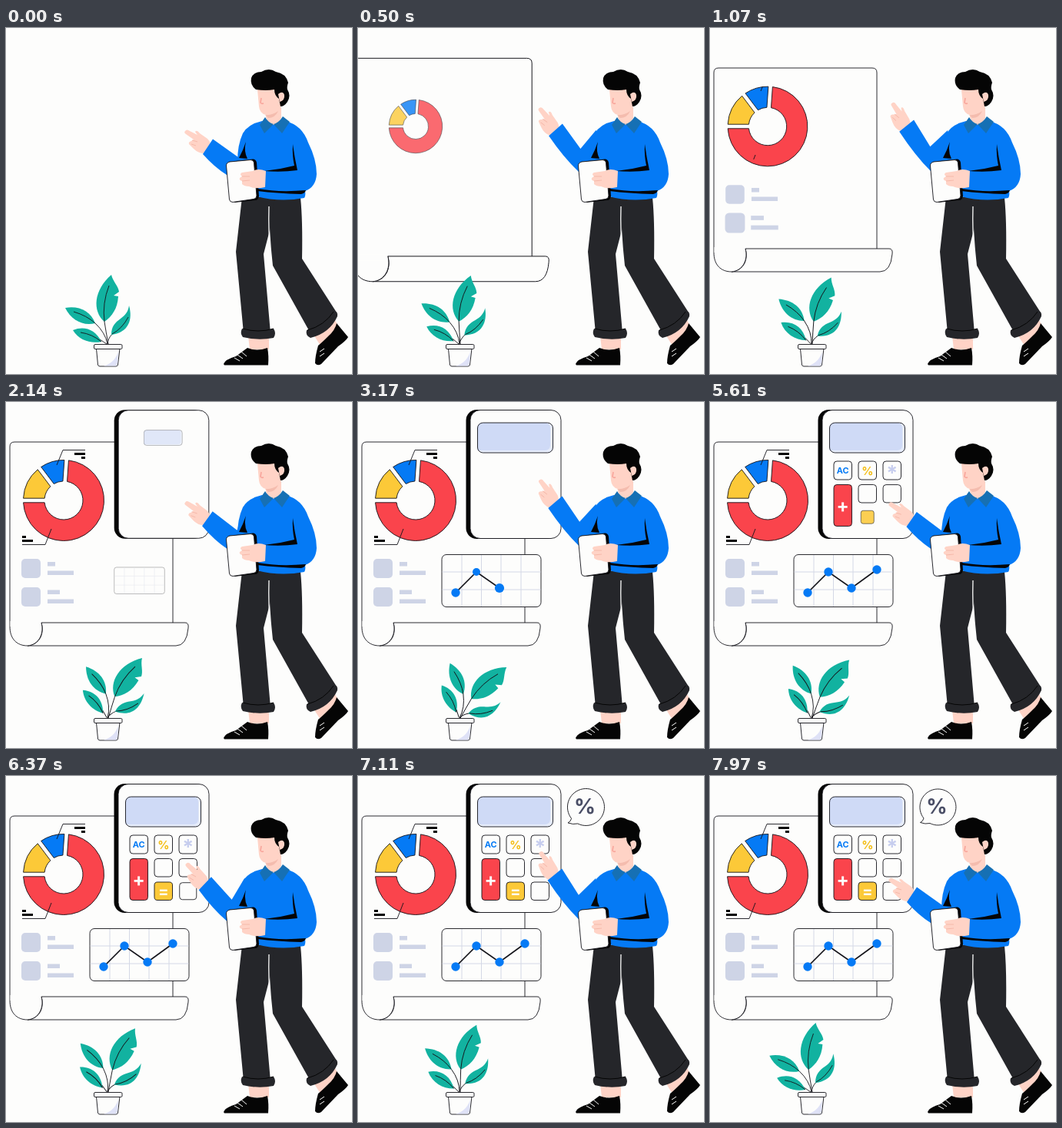
An HTML page for the animation above (8000 ms loop, 450x450 px).

```html
<!DOCTYPE html>
<html lang="en">
<head>
<meta charset="utf-8">
<title>Presenting figures</title>
<style>
  html, body { margin: 0; width: 100%; height: 100%; overflow: hidden; background: #fdfdfc; }
  svg { display: block; width: 100vw; height: 100vh; }
  text { font-family: Inter, "Liberation Sans", sans-serif; font-weight: 700; text-anchor: middle; }
  .line { fill: none; stroke: #14141a; stroke-width: .9; }
  .box { fill: #fdfdfc; stroke: #14141a; stroke-width: .9; }
  .ink { fill: #050505; }
  .skin { fill: #ffd3c6; }
  .blue { fill: #057af5; }
  .pants { fill: #25262a; }
  .leaf { fill: #12b2a0; }
  .grey { fill: #ced4e6; }
</style>
</head>
<body>
<svg viewBox="0 0 450 450">
  <g data-pop="60 121 184 soft">
    <path class="box" d="M5 292V58Q5 52 11 52H211Q217 52 217 58V287"/>
    <path class="box" d="M46 287H233Q238 287 237 294Q235 317 221 317H28Q40 316 45 306Q49 297 46 287Z"/>
    <path class="box" d="M5 292C5 308 14 317 28 317C42 316 50 302 46 287"/>
    <path d="M5.500 285H45V292H5.500Z" fill="#fdfdfc"/>
  </g>

  <g id="pie" data-pop="450 75 128" stroke="#14141a" stroke-width=".9"></g>

  <g class="grey">
    <rect data-pop="500 32.5 216" x="20" y="204" width="25" height="25" rx="5"/>
    <g data-pop="550 71 216"><rect x="54" y="208" width="10" height="5.500"/><rect x="54" y="219.500" width="34" height="5.500"/></g>
    <rect data-pop="600 32.5 253" x="20" y="241" width="25" height="25" rx="5"/>
    <g data-pop="650 71 253"><rect x="54" y="244.500" width="16" height="5.500"/><rect x="54" y="256.500" width="34" height="5.500"/></g>
  </g>

  <path class="line" data-draw="1010 500" pathLength="1" d="M66 82L74 62.500H103"/>
  <path class="line" data-draw="1010 500" pathLength="1" d="M59 165L51 185.500H21"/>
  <g class="ink" data-pop="1450 96 70"><rect x="89" y="66" width="14" height="3"/><rect x="98" y="71" width="5" height="3"/></g>
  <g class="ink" data-pop="1450 28 178"><rect x="21" y="174" width="5" height="3"/><rect x="21" y="179" width="14" height="3"/></g>

  <g data-pop="1610 203 94">
    <rect class="ink" x="140.500" y="10" width="118" height="168" rx="14"/>
    <rect class="box" x="146" y="10.500" width="118" height="167" rx="13"/>
  </g>
  <g data-pop="2100 204 46.500">
    <rect x="155.500" y="27" width="98" height="39" rx="7" fill="#e6ecfa"/>
    <path d="M162 27H243Q250 27 250 34V56Q250 63 243 63H155.500V34Q155.500 27 162 27Z" fill="#cfdaf6"/>
    <rect class="line" x="155.500" y="27" width="98" height="39" rx="7"/>
  </g>
  <g id="keys"></g>

  <g data-pop="2100 173.500 232">
    <rect class="box" x="109" y="198.500" width="129" height="68" rx="6"/>
    <path d="M135 199V266M160.500 199V266M186 199V266M212 199V266M109.500 221H237.500M109.500 244H237.500" stroke="#d4d8e6" fill="none"/>
  </g>
  <path class="line" style="stroke-width:1.700" data-draw="2700 700" pathLength="1" d="M127 248L154 221L184 242L217 218"/>
  <g id="dots" class="blue"></g>

  <g data-pop="6620 296 40">
    <path class="box" d="M278 55A23.500 23.500 0 1 1 286 61.500Q280 63 273.500 60.500Q277 59 278 55Z"/>
    <text x="295" y="49" font-size="27" fill="#4a4e66">%</text>
  </g>

  <g id="plant">
    <path class="line" d="M132 411Q129 396 116 384M133 411Q130 395 128 382M131 411Q128 409 122 405M132 411Q132 405 138 398"/>
    <path class="leaf" d="M128 382C112 368 114 341 137 321C139 330 146 335 147 343L140 348L146 349C145 365 138 375 128 382Z"/>
    <path class="leaf" d="M116 384C100 388 85 380 77 364C95 361 110 368 116 384Z"/>
    <path class="leaf" d="M124 408C110 411 95 406 87 393C102 387 116 392 124 408Z"/>
    <path class="leaf" d="M137 399C137 388 142 383 149 378C156 373 159 368 160 361C165 379 160 396 137 399Z"/>
    <path class="line" d="M128 382Q125 358 134 335M116 384Q105 374 88 369M124 408Q112 398 97 396M138 398Q151 391 159 376"/>
  </g>
  <path class="box" d="M117.500 417L119.500 438Q120 440 122 440H143Q145 440 145.500 438L148 417Z"/>
  <path d="M146 421L145 438Q144 439.500 142 439.500H127Q141 436 146 421Z" fill="#dfe2f7"/>
  <rect class="box" x="114.500" y="411.500" width="36.500" height="6" rx="1.500"/>

  <!-- legs -->
  <path class="skin" d="M315 400H342V418H317ZM400 399L428 380L433 389L409 413Z"/>
  <path class="ink" d="M283 437Q285 431 299 427L314 416Q326 421 340 416Q342 426 341 438.500H284ZM430 384L445 402Q442 407 432 414L410 437Q405 440 402 436Q402 427 406 413Q411 409 419 401Q428 393 430 384Z"/>
  <path d="M297 429L304 433M301 425L308 430M306 421L313 427M408 421L414 417M408 427L414 423" stroke="#fdfdfc" fill="none"/>
  <path class="pants" d="M342 221H383Q386 250 385 300L430 370L424 384L396 397L347 309Q342 265 342 221Z"/>
  <path class="pants" d="M307 220H350L343 263L335 294L344 397H309L299 291Z"/>
  <path class="pants" d="M307 391Q328 397 348 391Q352 397 348 403Q328 407 308 402Q304 397 307 391ZM391 393Q414 387 426 368Q432 368 431 375Q421 397 396 403Q389 400 391 393Z"/>
  <path d="M308 391Q328 397 348 391M392 393Q414 387 426 369" stroke="#050505" fill="none"/>
  <path d="M342 232Q341 265 344 292" stroke="#fdfdfc" stroke-width="1.300" fill="none"/>

  <!-- pointing arm -->
  <g id="hand" class="skin">
    <path d="M233 134Q235 131 239 134L249 139L246 135Q248 132 252 137L262 144Q267 149 266 156L258 163Q250 163 244 157L238 151Q237 148 241 147L244 145L234 138Q231 136 233 134Z"/>
    <path d="M241 151L247 153M242 146L249 148" stroke="#f3b3a4" fill="none" stroke-width=".8"/>
  </g>
  <path id="sleeve" class="blue"/>

  <!-- torso -->
  <path class="blue" d="M333 121Q315 125 308 137Q301 152 301 174L325 184L326 219Q356 227 388 221Q390 218 389 212Q403 207 404 190Q404 171 393 149Q385 126 363 121Z"/>
  <path class="ink" d="M312 148Q309 160 314 170L303 169Q308 160 312 148ZM373 151Q375 167 379 185Q358 188 336 186Q356 184 375 179Q372 165 373 151ZM327 209Q355 214 390 211Q389 215 384 216Q352 215 327 212Z"/>
  <path class="skin" d="M339 103H358V117Q353 127 347 126Q340 124 338 116Z"/>
  <path d="M337 116L330 126L336 137L348 125L359 137L369 122L360 115Q355 123 348 125Q341 123 337 116Z" fill="#1670b4"/>

  <!-- head -->
  <path class="skin" d="M327 80Q340 73 355 81L358 108Q349 115 338 113Q330 111 329 102Z"/>
  <path d="M332 91L331 97Q332 99 335 98" stroke="#f8a49a" fill="none" stroke-width="1.600"/>
  <path d="M337 113Q346 114 354 108Q350 117 341 117Z" fill="#f4bcae"/>
  <path class="ink" d="M325 80Q317 74 319 65Q322 57 332 57Q342 51 351 57Q364 59 367 71Q365 77 366 80Q371 88 366 96Q362 102 357 102L355 92Q349 88 349 80Q338 82 325 80Z"/>
  <path class="skin" d="M354 86Q360 81 362 87Q363 94 356 96Z"/>

  <!-- tablet -->
  <path class="ink" d="M290 174L321 170.500Q325 170.500 326 175L329 219Q328 224 324 224L297 227Z"/>
  <path class="box" d="M291 174L318 171.500Q322 171.500 322.500 175L326 218Q326 222 322 222.500L295 226.500Q291 226.500 290.500 223L286.500 179Q286.500 175 291 174Z"/>
  <path class="skin" d="M338 186Q328 182 321 186L307 188Q303 190 307 193L304 195Q303 198 307 199L307 203Q310 206 316 206Q324 210 337 207Z"/>
  <path d="M307 193L317 193M307 199L317 198" stroke="#f3b3a4" fill="none" stroke-width=".8"/>
</svg>
<script>
const LOOP = 8000, $ = id => document.getElementById(id);
const PAPER = '#fdfdfc', RED = '#fa444c', BLUE = '#057af5', YELLOW = '#fcc938';

const point = (r, deg, gap) => {
  const a = deg * Math.PI / 180 + Math.asin(gap / r);
  return `${75 + r * Math.sin(a)} ${128 - r * Math.cos(a)}`;
};
function slice(from, to, fill) {
  const R = 52.5, r = 25, g = 2.8, big = to - from > 180 ? 1 : 0;
  return `<path fill="${fill}" d="M${point(R, from, g)}A${R} ${R} 0 ${big} 1 ${point(R, to, -g)}
    L${point(r, to, -g)}A${r} ${r} 0 ${big} 0 ${point(r, from, g)}Z"/>`;
}
$('pie').innerHTML = slice(4, 270, RED) + slice(270, 323, YELLOW) + slice(323, 364, BLUE);

// start, x, y, height, fill, label, label colour, size, label drop
const keys = [
  [3165, 161, 77, 24, PAPER, 'AC', BLUE, 11, 4],
  [3640, 193, 77, 24, PAPER, '%', '#f3bd14', 15, 5.5],
  [4115, 225, 77, 24, PAPER, '*', '#c6cdee', 27, 13],
  [4590, 161, 107.5, 54, RED, '+', PAPER, 24, 8.5],
  [4590, 193, 107.5, 23.5, PAPER],
  [5070, 225, 107.5, 23.5, PAPER],
  [5556, 193, 138, 23.5, YELLOW, '=', PAPER, 20, 7],
  [6030, 225, 138, 23.5, PAPER]
];
$('keys').innerHTML = keys.map(([start, x, y, h, fill, label, color, size, drop]) => {
  const cx = x + 11.75, cy = y + h / 2;
  const late = label === '=' ? `data-pop="${start + 90} ${cx} ${cy}"` : '';
  return `<g data-pop="${start} ${cx} ${cy}">
    <rect class="box" style="fill:${fill}" x="${x}" y="${y}" width="23.5" height="${h}" rx="4"/>
    ${label ? `<text ${late} x="${cx}" y="${cy + drop}" font-size="${size}" fill="${color}">${label}</text>` : ''}</g>`;
}).join('');

$('dots').innerHTML = [[127, 248], [154, 221], [184, 242], [217, 218]].map(([x, y], i) =>
  `<circle data-pop="${2650 + i * 220} ${x} ${y}" cx="${x}" cy="${y}" r="5.7"/>`).join('');

const clamp = v => Math.max(0, Math.min(1, v));
const smooth = u => (1 - Math.cos(Math.PI * clamp(u))) / 2;
const elastic = u => u <= 0 ? 0 : u >= 1 ? 1 :
  1 + 2 ** (-10 * u) * Math.sin((u * 10 - 0.75) * 2 * Math.PI / 3);
const backOut = u => { const v = clamp(u) - 1; return 1 + 2.7 * v ** 3 + 1.7 * v ** 2; };

const pops = [...document.querySelectorAll('[data-pop]')].map(el => {
  const [start, x, y, kind] = el.dataset.pop.split(' ');
  return { el, start: +start, x, y, soft: kind === 'soft' };
});
const draws = [...document.querySelectorAll('[data-draw]')].map(el => {
  const [start, length] = el.dataset.draw.split(' ').map(Number);
  el.style.strokeDasharray = '1 2';
  return { el, start, length };
});

const mix = (a, b, u) => a + (b - a) * u;
// sleeve outline with the arm lowered and raised; the fifth point bends the lower edge
const low = [[269, 144.5], [302, 168], [312, 132], [322, 182], [287, 191], [271, 181], [256, 164]];
const high = [[265, 119], [286, 154], [309, 133], [322, 182], [287, 186], [267, 166], [246, 134]];

function poseArm(u) {
  const p = low.map(([x, y], i) => `${mix(x, high[i][0], u)} ${mix(y, high[i][1], u)}`);
  $('sleeve').setAttribute('d', `M${p[0]}L${p[1]}L${p[2]}L${p[3]}L${p[4]}Q${p[5]} ${p[6]}Z`);
  $('hand').setAttribute('transform',
    `translate(${mix(0, -7, u)} ${mix(0, -27, u)}) rotate(${25 * u} 262 154)`);
}

function render(t) {
  for (const { el, start, x, y, soft } of pops) {
    const s = soft ? backOut((t - start) / 700) : elastic((t - start) / 1000);
    const shown = t > start && s > 0.001;
    el.style.visibility = shown ? 'visible' : 'hidden';
    if (!shown) continue;
    el.setAttribute('transform', `translate(${x} ${y}) scale(${s}) translate(${-x} ${-y})`);
    el.style.opacity = Math.min(1, s * 1.2);
  }
  for (const { el, start, length } of draws) {
    const u = clamp((t - start) / length);
    el.style.visibility = u ? 'visible' : 'hidden';
    el.style.strokeDashoffset = 1 - u;
  }
  const move = smooth(t % 1000 / 720);
  poseArm(Math.floor(t / 1000) % 2 ? 1 - move : move);

  const sway = 50 * (1 - Math.abs(1 - 2 * t / LOOP));
  $('plant').setAttribute('transform', `rotate(${sway} 132 411)`);
}

const begin = performance.now();
function tick() {
  render((performance.now() - begin) % LOOP);
  requestAnimationFrame(tick);
}
tick();
</script>
</body>
</html>
```
